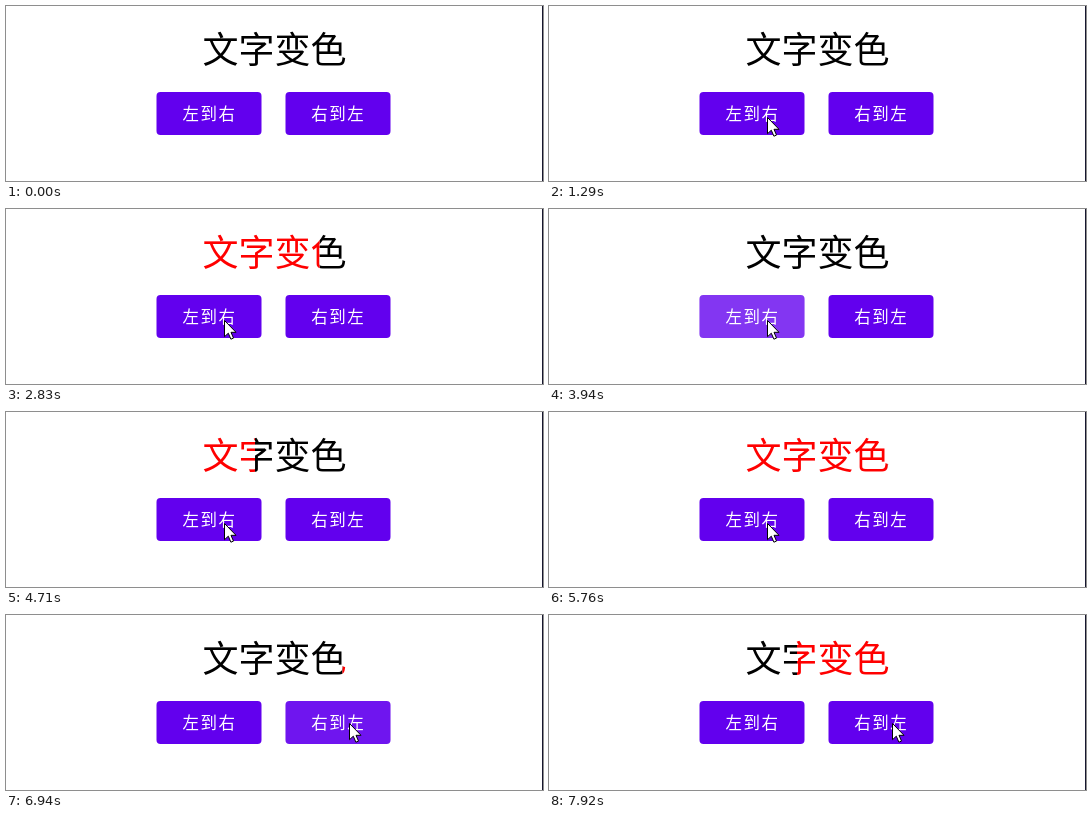
Write an HTML page that moves like this. It is 537 px wide and 175 px high and loops after 7.99 s.

```html
<!DOCTYPE html>
<html lang="zh-CN">
<head>
<meta charset="utf-8">
<title>文字变色</title>
<style>
  html, body { margin: 0; width: 100%; height: 100%; overflow: hidden; background: #fff; }
  svg { display: block; width: 537px; height: 175px; }
  text { font-family: "Noto Sans CJK SC", "Noto Sans CJK", "Noto Sans CJK JP", sans-serif; }
  .title { font-size: 36px; }
  .label { font-size: 16.5px; letter-spacing: 1.5px; fill: #fff; }
  .button { fill: #6200ee; }
</style>
</head>
<body>
<svg viewBox="0 0 537 175">
  <defs>
    <clipPath id="redClip"><rect id="redArea" y="0" height="80"/></clipPath>
    <clipPath id="blackClip"><rect id="blackArea" y="0" height="80"/></clipPath>
    <clipPath id="leftClip"><rect x="150.5" y="86" width="105" height="43" rx="4"/></clipPath>
    <clipPath id="rightClip"><rect x="279.5" y="86" width="105" height="43" rx="4"/></clipPath>
  </defs>
  <rect width="537" height="175" fill="#fff"/>
  <rect x="536" width="1" height="175" fill="#17172f"/>

  <g clip-path="url(#blackClip)"><text class="title" x="196.5" y="56.5" fill="#000">文字变色</text></g>
  <g clip-path="url(#redClip)"><text class="title" x="196.5" y="56.5" fill="#f00">文字变色</text></g>

  <g clip-path="url(#leftClip)">
    <rect class="button" x="150" y="86" width="106" height="43"/>
    <circle id="leftRipple" fill="#fff"/>
  </g>
  <g clip-path="url(#rightClip)">
    <rect class="button" x="279" y="86" width="106" height="43"/>
    <circle id="rightRipple" fill="#fff"/>
  </g>
  <text class="label" x="176.6" y="113.8">左到右</text>
  <text class="label" x="305.2" y="113.8">右到左</text>

  <path id="cursor" d="M0 0V16.2L3.8 12.7L6.4 18.7L9 17.6L6.5 11.8H11.5Z"
        fill="#fff" stroke="#000" stroke-width="1" stroke-linejoin="round"/>
</svg>
<script>
const LOOP = 7990, WIPE = 2000, LEFT = 196.5, RIGHT = 340;
const el = id => document.getElementById(id);
const clamp = v => Math.min(1, Math.max(0, v));
const mix = (a, b, k) => a + (b - a) * k;
const ease = k => 0.5 - 0.5 * Math.cos(Math.PI * clamp(k));

const clicks = [
  { press: 1330, start: 1395, side: "left" },
  { press: 3610, start: 3885, side: "left" },
  { press: 6550, start: 6740, side: "right" }
];
const buttons = {
  left: { ripple: el("leftRipple"), from: [218, 111], center: [203, 107.5] },
  right: { ripple: el("rightRipple"), from: [343, 108], center: [332, 107.5] }
};

// time, x, y
const path = [
  [500, 196.5, 178], [740, 199, 140], [960, 206, 104], [1080, 212, 101.5],
  [1270, 218.5, 111.5], [5830, 218.5, 111.5], [5970, 250, 111],
  [6110, 303.5, 109], [6240, 338, 108.5], [6320, 343.5, 108.5]
];

function cursorAt(t) {
  if (t >= path[path.length - 1][0]) return path[path.length - 1].slice(1);
  const i = path.findIndex(p => p[0] > t);
  if (i < 1) return [196.5, 190];
  const [a, b] = [path[i - 1], path[i]];
  const k = (t - a[0]) / (b[0] - a[0]);
  return [mix(a[1], b[1], k), mix(a[2], b[2], k)];
}

function setSpan(id, a, b) {
  el(id).setAttribute("x", a);
  el(id).setAttribute("width", Math.max(0, b - a));
}

function drawTitle(t) {
  const run = clicks.filter(c => t >= c.start).pop();
  const k = run ? ease((t - run.start) / WIPE) : 0;
  if (run && run.side === "right") {
    const edge = mix(RIGHT, LEFT, k);
    setSpan("blackArea", 0, edge);
    setSpan("redArea", edge, 537);
  } else {
    const edge = mix(LEFT, RIGHT, k);
    setSpan("redArea", 0, k === 1 ? 537 : edge);
    setSpan("blackArea", k === 1 ? 537 : edge, 537);
  }
}

function drawRipple(side, t) {
  const { ripple, from, center } = buttons[side];
  const hit = clicks.filter(c => c.side === side && t >= c.press).pop();
  let alpha = 0;
  if (hit) {
    const age = t - hit.press;
    const fade = Math.max(hit.start + 25, hit.press + 225);
    const k = 1 - (1 - clamp(age / 225)) ** 2;
    alpha = 0.24 * clamp(age / 75) * (1 - clamp((t - fade) / 250));
    ripple.setAttribute("cx", mix(from[0], center[0], k));
    ripple.setAttribute("cy", mix(from[1], center[1], k));
    ripple.setAttribute("r", mix(20, 60, k));
  }
  ripple.setAttribute("opacity", alpha);
}

function draw(t) {
  drawTitle(t);
  drawRipple("left", t);
  drawRipple("right", t);
  el("cursor").setAttribute("transform", `translate(${cursorAt(t).join(" ")})`);
}

const begin = performance.now();
function tick() {
  draw((performance.now() - begin) % LOOP);
  requestAnimationFrame(tick);
}
tick();
</script>
</body>
</html>
```
